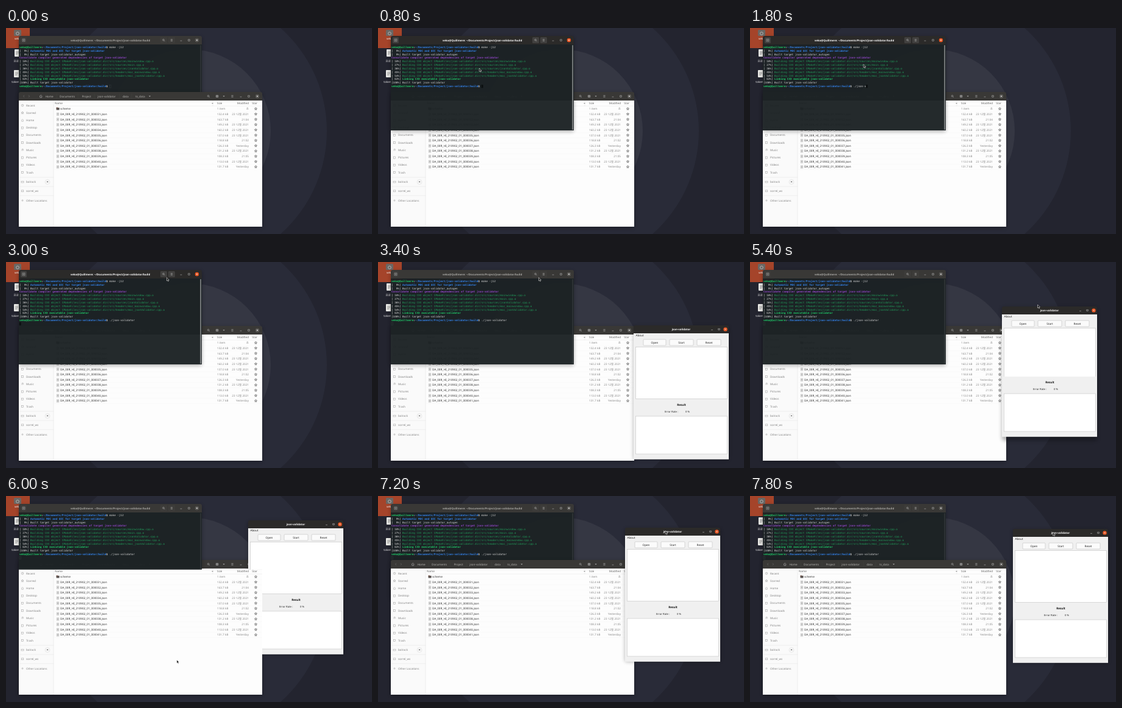
Animation of 600 by 338 pixels, one loop 8000 ms. Source, as an HTML page:

```html
<!DOCTYPE html>
<html lang="en">
<head>
<meta charset="utf-8">
<title>Desktop session</title>
<style>
html, body { margin: 0; width: 100%; height: 100%; overflow: hidden; background: #23242f; }
svg { display: block; width: 600px; height: 338px; }
text { font-family: "Noto Sans", "Noto Sans CJK KR", "Noto Sans CJK", sans-serif; font-size: 4.6px; white-space: pre; text-rendering: geometricPrecision; }
.mono { font-family: "DejaVu Sans Mono", monospace; font-size: 4.3px; }
.b { font-weight: 700; }
</style>
</head>
<body>
<svg id="stage" viewBox="0 0 600 338" xmlns="http://www.w3.org/2000/svg"></svg>
<script>
const LOOP = 8000, STEP = 200, CHAR = 2.59;
const $ = id => document.getElementById(id);

const rect = (x, y, w, h, fill, more = '') =>
  `<rect x="${x}" y="${y}" width="${w}" height="${h}" fill="${fill}" ${more}/>`;
const text = (x, y, s, fill, more = '') => `<text x="${x}" y="${y}" fill="${fill}" ${more}>${s}</text>`;
const line = (d, color, w = 0.6, more = '') =>
  `<path d="${d}" fill="none" stroke="${color}" stroke-width="${w}" ${more}/>`;
const ring = (x, y, r, color, w = 0.6) =>
  `<circle cx="${x}" cy="${y}" r="${r}" fill="none" stroke="${color}" stroke-width="${w}"/>`;
const mid = 'text-anchor="middle"', end = 'text-anchor="end"';

const shadow = (x, y, w, h) => rect(x, y, w, h, '#000', 'rx="3" opacity=".3" filter="url(#soft)"');
const bar = (id, x, y, w, h) =>
  `<path id="${id}Bar" d="M${x} ${y + h}v${3 - h}q0-3 3-3h${w - 6}q3 0 3 3v${h - 3}z"/>`;

// minimise, maximise and close, with a dot that lights on focus
function controls(id, xs, y) {
  const [a, b, c] = xs;
  return line(`M${a - 1.4} ${y + 1}h2.8`, '#bbb') +
    rect(b - 1.2, y - 1.2, 2.4, 2.4, 'none', 'stroke="#bbb" stroke-width=".6"') +
    `<circle id="${id}Dot" cx="${c}" cy="${y}" r="3.2"/>` +
    line(`M${c - 1.2} ${y - 1.2}l2.4 2.4m0-2.4l-2.4 2.4`, '#e8e8e8', 0.7);
}
const glass = (x, y, c) => ring(x - 0.4, y - 0.4, 1.3, c) + line(`M${x + 0.6} ${y + 0.6}l1.3 1.3`, c);
const burger = (x, y, c) => line(`M${x - 1.6} ${y - 1.4}h3.2m-3.2 1.4h3.2m-3.2 1.4h3.2`, c, 0.5);

function star(x, y, color) {
  let d = '';
  for (let i = 0; i < 10; i++) {
    const r = i % 2 ? 1 : 2.1, a = i * Math.PI / 5 - Math.PI / 2;
    d += `${i ? 'L' : 'M'}${(x + r * Math.cos(a)).toFixed(2)} ${(y + r * Math.sin(a)).toFixed(2)}`;
  }
  return line(d + 'z', color, 0.6);
}

function desktop() {
  const disc = (r, fill) => `<circle cx="300" cy="169" r="${r}" fill="${fill}"/>`;
  const page = (x, y) => rect(x, y, 9, 12, '#e9e9e6', 'rx="1"') +
    line(`M${x + 2} ${y + 4}h5m-5 2h5m-5 2h3`, '#777', 0.7);
  return rect(0, 0, 600, 338, '#23242f') + disc(226, '#292b38') + disc(134, '#353743') +
    rect(0, 0, 39, 33, '#a5442a') + rect(13, 3, 12, 10, '#6a6764', 'rx="1.5"') +
    ring(19, 9, 2.4, '#c4c4c6', 0.8) + text(19, 18.5, 'veko', '#fff', mid) +
    page(14, 35) + text(21, 56, '프로그램', '#eee', mid) +
    page(13, 69) + text(19, 89.5, 'token.txt', '#eee', mid);
}

const PROMPT = '<tspan fill="#1fcb69">veko@Quillmere</tspan>:<tspan fill="#3484ee">~/Documents/Project/json-validator/build</tspan>$ ';
const COMMAND = './json-validator';
const lineY = i => 33 + i * 5.83;

function terminal() {
  const build = (pct, file) => [`[ ${pct}%] <tspan fill="#22a05c">Building CXX object CMakeFiles/json-validator.dir/src/${file}.cpp.o</tspan>`];
  const rows = [
    [PROMPT + '<tspan font-weight="400">make -j12</tspan>', 1],
    ['[  9%] <tspan fill="#3484ee" font-weight="700">Automatic MOC and UIC for target json-validator</tspan>'],
    ['[  9%] Built target json-validator_autogen'],
    ['<tspan fill="#8f45c4">Consolidate compiler generated dependencies of target json-validator</tspan>', 1],
    build(18, 'sources/mainwindow'), build(27, 'sources/main'), build(36, 'sources/jsonValidator'),
    build(45, 'headers/moc_mainwindow'), build(54, 'headers/moc_jsonValidator'),
    ['[ 63%] <tspan fill="#1fcb69" font-weight="700">Linking CXX executable json-validator</tspan>'],
    ['[100%] Built target json-validator'],
    [PROMPT, 1]
  ];
  return shadow(21, 15, 300, 155) + bar('term', 21, 13, 300, 14) +
    rect(21, 27, 300, 141, 'rgba(29,35,37,.95)') +
    '<g id="caps" fill="#fff">' + [[24, 10], [253, 11], [266, 11]]
      .map(([x, w]) => `<rect x="${x}" y="15" width="${w}" height="10" rx="1.5"/>`).join('') + '</g>' +
    rect(27, 18, 4, 4, 'none', 'stroke="#bbb" stroke-width=".5"') + line('M29 18.8v2.4m-1.2-1.2h2.4', '#bbb', 0.5) +
    glass(258.5, 20, '#bbb') + burger(271.5, 20, '#bbb') +
    text(171, 21.8, 'veko@Quillmere: ~/Documents/Project/json-validator/build', '#fff', `id="termTitle" class="b" style="font-size:4.4px" ${mid}`) +
    controls('term', [287, 300, 313], 20) +
    rows.map(([s, bold], i) => text(22, lineY(i), s, '#dcdcdc', `class="mono${bold ? ' b' : ''}"`)).join('') +
    text(22 + 57 * CHAR, lineY(11), '', '#dcdcdc', 'id="typed" class="mono"') +
    rect(0, 0, 2.4, 4.8, 'none', 'id="block" stroke-width=".4"') +
    rect(318.4, 28, 1.4, 139, '#b4b6b6', 'id="scroll" rx=".7"');
}

function files() {
  let s = shadow(21, 107, 399, 221) + bar('file', 21, 105, 399, 14) + rect(21, 119, 399, 207, '#fdfdfd') +
    rect(21, 119, 57, 207, '#fafafa') + line('M78 119v207', '#ddd', 0.5);
  s += line('M30 110.4l-1.6 1.6 1.6 1.6M37 110.4l1.6 1.6-1.6 1.6', '#777') +
    line('M55 112l2.2-2 2.2 2m-3.6 0v2h2.8v-2', '#bbb', 0.6);
  [['Home', 71], ['Documents', 100.5], ['Project', 132], ['json-validator', 165], ['data', 196], ['ts_data', 220]]
    .forEach(([n, x]) => s += text(x, 113.6, n, '#b5b4b1', mid));
  [83, 118, 145, 186, 206].forEach(x => s += line(`M${x} 108v8`, '#454442', 0.5));
  s += '<path d="M234 111.3h3.2l-1.6 1.8zM355.5 111.3h3.2l-1.6 1.8z" fill="#aaa"/>' + glass(332, 112, '#bbb') +
    line('M344.4 110.4h3.4v3.2h-3.4zM346.1 110.4v3.2m-1.7-1.6h3.4', '#bbb', 0.6) +
    burger(371, 112, '#bbb') + controls('file', [385, 398, 412], 112);

  const places = ['Recent', 'Starred', 'Home', 'Desktop', 'Documents', 'Downloads', 'Music', 'Pictures', 'Videos', 'Trash'];
  places.forEach((n, i) => {
    const y = 127 + i * 12.22;
    s += text(33, y + 1.6, n, '#808080');
    s += i === 0 ? ring(27, y, 1.8, '#999', 0.5) + line(`M27 ${y - 1}v1h1`, '#999', 0.4) :
      i === 1 ? star(27, y, '#999') :
      i === 2 ? line(`M25 ${y}l2-1.8 2 1.8m-3.3 0v1.8h2.6v-1.8`, '#999', 0.5) :
      i === 6 ? line(`M26.2 ${y + 1.4}v-3h2v2.6`, '#999', 0.6) :
      rect(25.4, y - 1.5, 3.2, 3.2, 'none', 'stroke="#999" stroke-width=".5"');
  });
  s += line('M21 245h57M21 260h57M21 275h57', '#e0e0e0', 0.5) +
    rect(25, 251.5, 4, 2.4, 'none', 'stroke="#999" stroke-width=".5"') + text(33, 254.3, 'bolrack', '#808080') +
    '<circle cx="68" cy="252.6" r="4" fill="#f5f5f5" stroke="#ddd" stroke-width=".5"/><path d="M66.7 253l1.3-1.7 1.3 1.7z" fill="#555"/>' +
    rect(25.2, 266, 3.6, 2.8, 'none', 'stroke="#999" stroke-width=".5"') + text(33, 269.2, 'sorrel_ws', '#808080') +
    line('M25.2 283h3.6m-1.8-1.8v3.6', '#999', 0.5) + text(33, 284.7, 'Other Locations', '#808080');

  s += line('M78 128h342M339 119v9', '#e2e2e2', 0.5) +
    text(80, 125.4, 'Name', '#666') + text(346, 125.4, 'Size', '#666') +
    text(398, 125.4, 'Modified', '#666', end) + text(412, 125.4, 'Star', '#666', end) +
    '<path d="M337 123h3l-1.5 1.6z" fill="#888"/>';

  const day = '23 12월 2021';
  const rows = [['132.4', day], ['163.7', '21:04'], ['149.2', day], ['160.2', day], ['137.0', day], ['118.8', '21:02'],
    ['126.3', 'Yesterday'], ['131.2', day], ['108.3', '21:05'], ['113.0', day], ['131.7', 'Yesterday']];
  const row = (i, name, size, when) => {
    const y = 132.6 + i * 8.66;
    s += text(89, y + 1.6, name, '#2e2e2e') + text(346, y + 1.6, size, '#888') +
      text(398, y + 1.6, when, '#888', end) + star(409.5, y, '#333') +
      line(`M79 ${y + 4.4}h340`, '#f1f1f1', 0.4);
    s += i ? rect(83, y - 2.2, 3.8, 4.6, '#e4e4e4', 'stroke="#aaa" stroke-width=".4" rx=".4"') + line(`M84 ${y - 0.6}h1.8m-1.8 1.3h1.8`, '#777', 0.5)
      : rect(82.5, y - 1.8, 5, 3.8, '#5b5553', 'rx=".5"') + rect(82.5, y - 2.2, 2.4, 1.2, '#77503f');
  };
  row(0, 'scheme', '1 item', '초');
  rows.forEach(([kb, when], i) => row(i + 1, `DA_00R_HI_210902_01_0000${31 + i}.json`, kb + ' kB', when));
  return s;
}

function app() {
  const pane = (y, h) => rect(3.3, y, 150, h, '#fff', 'stroke="#c4c4c4" stroke-width=".6"');
  const button = (x, w, s) => rect(x, 23, w, 10, '#fbfbfb', 'rx="1" stroke="#c2c2c2" stroke-width=".6"') +
    text(x + w / 2, 29.7, s, '#222', mid);
  return shadow(0, 2, 156, 218) + bar('app', 0, 0, 156, 13) + rect(0, 13, 156, 110, '#f0f0f0') +
    text(78, 8, 'json-validator', '#fff', `id="appTitle" class="b" style="font-size:4.4px" ${mid}`) +
    controls('app', [128.5, 140, 150.5], 6.4) + text(3.5, 17.8, 'About', '#222') +
    button(16, 37, 'Open') + button(59, 39, 'Start') + button(104, 39, 'Reset') + pane(35.6, 85) +
    '<g id="lower">' + rect(0, 121, 156, 98.8, '#f0f0f0') +
    text(78.5, 132, 'Result', '#111', `class="b" style="font-size:4.7px" ${mid}`) +
    text(51, 142.6, 'Error Rate :', '#222', 'style="font-size:4.2px"') +
    text(85, 142.6, '0 %', '#222', 'style="font-size:4.2px"') + pane(149, 62) + '</g>';
}

$('stage').innerHTML =
  '<defs><filter id="soft" x="-15%" y="-15%" width="130%" height="130%"><feGaussianBlur stdDeviation="3"/></filter>' +
  '<clipPath id="torn"><path d="M0 0h600v338h-180v-217.3h-420z"/></clipPath></defs>' +
  desktop() + `<g id="windows"><g id="fileWin">${files()}</g><g id="termWin">${terminal()}</g>` +
  `<g id="appWin"><g id="app">${app()}</g></g></g>` +
  '<path id="mouse" d="M0 0v5.4l1.3-1.1.9 2 .9-.4-.9-1.9h1.7z" fill="#111" stroke="#fff" stroke-width=".5"/>';

// keys: [time, x, y], linear between
const mousePath = [[200, 220, 214], [800, 166, 66], [1600, 166, 66], [2400, 246, 40], [2800, 246, 40], [3000, 263.5, 25.5],
  [3600, 263.5, 25.5], [4200, 440, 88], [4400, 499, 116.5], [5200, 484, 112], [5400, 471.5, 70], [5800, 460, 45], [6000, 280, 269],
  [6400, 280, 269], [7000, 463, 45], [7200, 471, 57], [7400, 484, 69], [7600, 494, 59], [7800, 496.5, 59.5]];
const appPath = [[3400, 419, 104], [5200, 419, 104], [5400, 413, 73], [5600, 402, 50], [5800, 397, 40],
  [7000, 397, 40], [7200, 405, 52], [7400, 418, 64], [7600, 428, 54.5], [7800, 431, 54]];

function at(path, t) {
  const i = path.findIndex(k => k[0] >= t);
  if (i < 0) return path[path.length - 1].slice(1);
  if (i === 0) return path[0].slice(1);
  const a = path[i - 1], b = path[i], p = (t - a[0]) / (b[0] - a[0]);
  return [a[1] + (b[1] - a[1]) * p, a[2] + (b[2] - a[2]) * p];
}
const set = (id, name, v) => $(id).setAttribute(name, v);
const place = (id, path, t) => set(id, 'transform', `translate(${at(path, t).join(' ')})`);
const show = (id, on) => set(id, 'visibility', on ? 'visible' : 'hidden');

function focusAt(t) {
  if (t < 600) return '';
  if (t < 3400) return 'term';
  if (t < 6200) return 'app';
  return t < 7000 ? 'file' : 'app';
}

// window order, back to front
function stackAt(t) {
  if (t < 600) return ['app', 'term', 'file'];
  if (t < 6200) return ['file', 'term', 'app'];
  return t < 7000 ? ['term', 'app', 'file'] : ['term', 'file', 'app'];
}

let stacked = '';
function draw(time) {
  const t = Math.floor(time % LOOP / STEP) * STEP;
  const focus = focusAt(t), stack = stackAt(t), live = focus === 'term';
  if (stacked !== stack.join()) {
    stack.forEach(id => $('windows').appendChild($(id + 'Win')));
    stacked = stack.join();
  }
  // the raise shows half drawn for one step
  for (const id of ['termWin', 'appWin']) set(id, 'clip-path', t === 6000 ? 'url(#torn)' : 'none');

  for (const id of stack) {
    set(id + 'Dot', 'fill', focus === id ? '#e95420' : '#575653');
    set(id + 'Bar', 'fill', focus === id ? '#2b2a29' : '#393836');
  }
  set('termTitle', 'fill', live ? '#fff' : '#a9a8a5');
  set('appTitle', 'fill', focus === 'app' ? '#fff' : '#a9a8a5');
  set('caps', 'opacity', live ? 0.1 : 0.02);
  set('scroll', 'opacity', live ? 0.8 : 0.15);

  const count = Math.round(Math.max(0, Math.min(1, (t - 1200) / 1200)) * COMMAND.length);
  $('typed').textContent = COMMAND.slice(0, count);
  const entered = t >= 3000;
  set('block', 'x', entered ? 22 : 22 + (57 + count) * CHAR);
  set('block', 'y', lineY(entered ? 12 : 11) - 3.9);
  set('block', 'fill', live ? '#0c1011' : 'none');
  set('block', 'stroke', live ? '#0c1011' : '#383f41');

  show('app', t >= 3400);
  place('app', appPath, t);
  set('lower', 'transform', `translate(0 ${t === 5400 ? -6 : 0})`);
  show('mouse', t >= 200);
  place('mouse', mousePath, t);
}

function tick() {
  draw(performance.now());
  requestAnimationFrame(tick);
}
tick();
</script>
</body>
</html>
```
